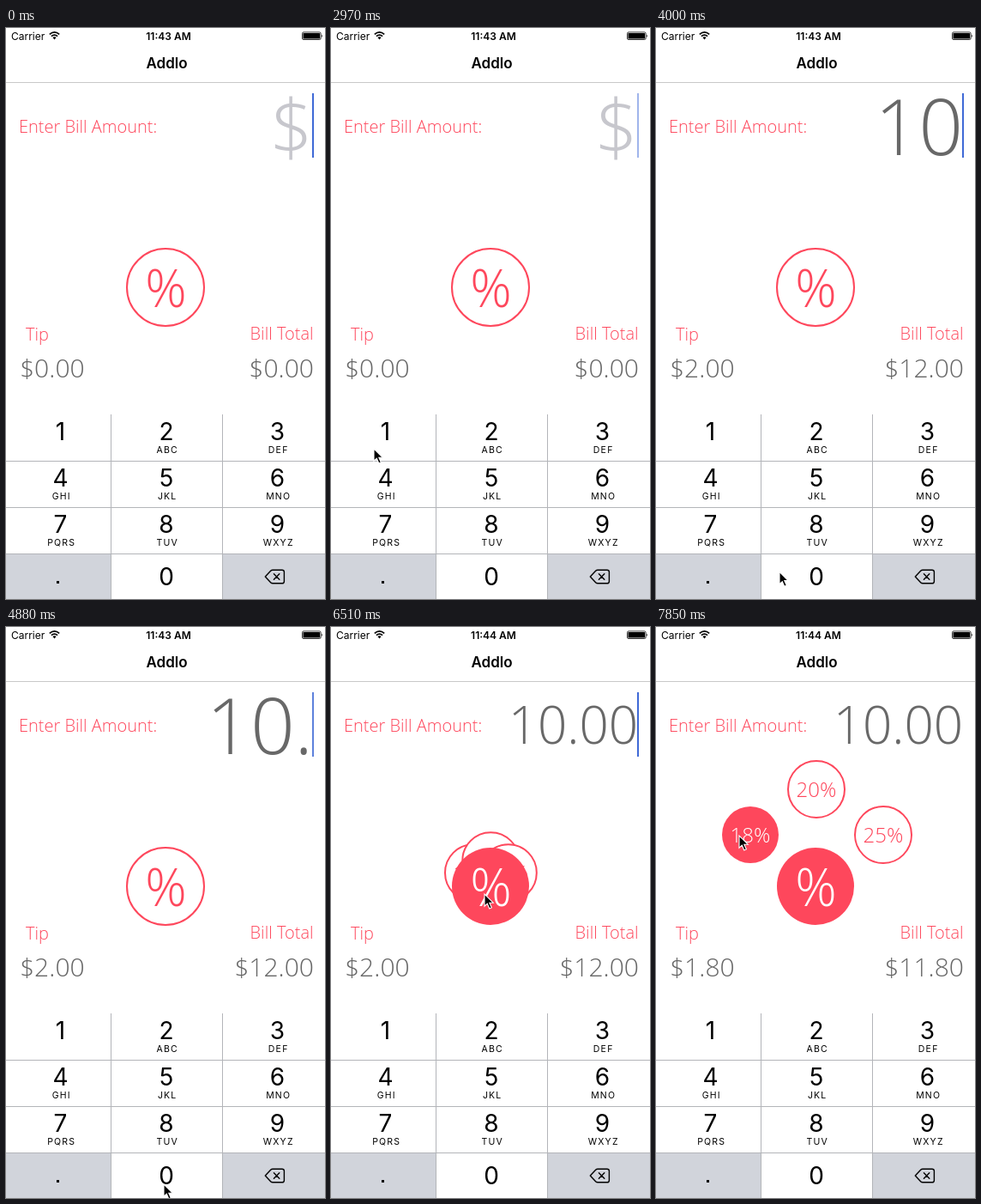
Animation, 372 px wide and 665 px high, one loop 8000 ms. Source, as an HTML page:

```html
<!DOCTYPE html>
<html lang="en">
<head>
<meta charset="utf-8">
<title>Tip calculator</title>
<style>
html, body { margin: 0; width: 100%; height: 100%; overflow: hidden; background: #fff; }
svg { display: block; width: 372px; height: 665px; }
text { font-family: Inter, Roboto, sans-serif; fill: #000; }
.light { font-family: "Open Sans", "Noto Sans", sans-serif; font-weight: 300; }
.red { fill: #fe475c; }
.gray { fill: #686868; }
.mid { text-anchor: middle; }
.end { text-anchor: end; }
</style>
</head>
<body>
<svg id="stage" viewBox="0 0 372 665" xmlns="http://www.w3.org/2000/svg">
  <rect width="372" height="665" fill="#fff"/>
  <text x="6" y="13.5" font-size="12">Carrier</text>
  <g fill="none" stroke="#000" stroke-width="1.7">
    <path d="M50.8 7.4Q56.5 2.4 62.2 7.4"/>
    <path d="M52.9 9.7Q56.5 6.5 60.1 9.7"/>
  </g>
  <path d="M54.4 11.1Q56.5 9.4 58.6 11.1L56.5 13.4Z"/>
  <text id="clock" class="mid" x="189.5" y="13.5" font-size="12" font-weight="600"></text>
  <rect x="345.5" y="4.9" width="21.6" height="8.6" rx="1.5" fill="none" stroke="#000" stroke-width=".8"/>
  <rect x="346.5" y="5.9" width="19.6" height="6.6" rx=".6"/>
  <path d="M368 7.5Q369.8 9.2 368 10.9Z"/>
  <text class="mid" x="187.5" y="47" font-size="17" font-weight="600">Addlo</text>
  <rect y="63" width="372" height="1" fill="#c9c9c9"/>

  <text class="light red" x="15" y="122" font-size="20">Enter Bill Amount:</text>
  <text id="bill" class="light end" x="358"></text>
  <rect id="caret" x="357" y="76" width="2" height="75" fill="#3f69d6"/>

  <g id="menu"></g>
  <circle id="button" cx="186" cy="302" r="45" stroke="#fe475c" stroke-width="2"/>
  <text id="percent" class="light mid" x="186.5" y="325" font-size="60">%</text>

  <text class="light red" x="23" y="364" font-size="20">Tip</text>
  <text class="light red end" x="358.5" y="363" font-size="20">Bill Total</text>
  <text id="tip" class="light gray" x="16" y="407" font-size="30"></text>
  <text id="total" class="light gray end" x="359" y="407" font-size="30"></text>

  <g id="pad"></g>
  <path d="M302.3 639L308.6 632.2Q309.6 631.2 311 631.2H322Q324.4 631.2 324.4 633.6V644.4Q324.4 646.8 322 646.8H311Q309.6 646.8 308.6 645.8ZM312.4 635.8L318.8 642.2M318.8 635.8L312.4 642.2"
    fill="none" stroke="#000" stroke-width="1.4" stroke-linejoin="round" stroke-linecap="round"/>
  <path id="pointer" d="M0 0V14.2L3.3 11.2L5.8 16.9L8.3 15.8L5.8 10.2H10.2Z" fill="#000" stroke="#fff" stroke-width="1.1"/>
</svg>
<script>
const LOOP = 8000, RED = '#fe475c', KEY = '#d1d4db';
const $ = id => document.getElementById(id);

function add(parent, tag, attrs, label) {
  const el = document.createElementNS('http://www.w3.org/2000/svg', tag);
  for (const k in attrs) el.setAttribute(k, attrs[k]);
  if (label) el.textContent = label;
  parent.appendChild(el);
  return el;
}
const set = (el, attrs) => { for (const k in attrs) el.setAttribute(k, attrs[k]); };
const clamp = v => Math.max(0, Math.min(1, v));
const smooth = v => { v = clamp(v); return v * v * (3 - 2 * v); };

// Keypad
const pad = $('pad'), keys = {};
const edges = [0, 122, 252, 372], mids = [63.5, 187, 316.5];
const letters = ['', 'ABC', 'DEF', 'GHI', 'JKL', 'MNO', 'PQRS', 'TUV', 'WXYZ'];
['1', '2', '3', '4', '5', '6', '7', '8', '9', '.', '0', 'del'].forEach((name, i) => {
  const col = i % 3, y = 450 + 54 * Math.floor(i / 3);
  const base = i === 9 || i === 11 ? KEY : '#fff';
  const rect = add(pad, 'rect', { x: edges[col], y, width: edges[col + 1] - edges[col], height: 54, fill: base });
  keys[name] = { rect, base, down: base === KEY ? '#fff' : KEY };
  if (name === '.') add(pad, 'rect', { x: 59, y: 644, width: 3, height: 3 });
  else if (name !== 'del') add(pad, 'text', { class: 'mid', x: mids[col], y: i < 9 ? y + 30 : 649, 'font-size': 28 }, name);
  if (letters[i]) add(pad, 'text', { class: 'mid', x: mids[col] + 1.2, y: y + 45, 'font-size': 10.5, 'letter-spacing': 1.2 }, letters[i]);
});
for (const y of [504, 558, 612]) add(pad, 'rect', { x: 0, y, width: 372, height: 1, fill: '#b3b5b9' });
for (const x of [122, 252]) add(pad, 'rect', { x, y: 450, width: 1, height: 215, fill: '#b3b5b9' });

// Tip choices that slide out from behind the button
const choices = [['18%', 110, 242], ['20%', 187, 189], ['25%', 265, 242]].map(([label, x, y]) => {
  const g = add($('menu'), 'g', {});
  const disc = add(g, 'circle', { r: 33, fill: '#fff', stroke: RED, 'stroke-width': 2 });
  const text = add(g, 'text', { class: 'light mid', y: 9, 'font-size': 24, fill: RED }, label);
  return { g, disc, text, x, y };
});

// Timeline
const entries = [
  [0, '', 90, 0], [3080, '1', 90, 1], [3760, '10', 90, 10],
  [4280, '10.', 90, 10], [4960, '10.0', 77, 10], [5110, '10.00', 60, 10]
];
const presses = [[3080, 3190, '1'], [3760, 3860, '0'], [4280, 4390, '.'], [4960, 5050, '0'], [5110, 5170, '0']];
const blinks = [
  [130, 720], [1180, 1630], [2080, 2520], [2890, 3080], [4855, 4960],
  [5640, 6060], [6560, 7000], [7470, 8100]
];
const path = [
  [1790, 337, 112], [1900, 333, 115], [2000, 333, 115], [2690, 136, 424], [2960, 50, 490],
  [3200, 50, 490], [3640, 176, 640], [3850, 176, 640], [4220, 88, 622], [4380, 88, 622],
  [4570, 184, 649], [5560, 184, 649], [6210, 179, 311], [6740, 179, 311], [7220, 97, 243], [8000, 97, 243]
];
const OPEN = 6400, PICK = 7520, MINUTE = 5700;

function pointerAt(t) {
  let i = path.findIndex(p => p[0] > t) - 1;
  if (i < 0) i = 0;
  const a = path[i], b = path[i + 1], k = smooth((t - a[0]) / (b[0] - a[0]));
  return [a[1] + (b[1] - a[1]) * k, a[2] + (b[2] - a[2]) * k];
}

function caretAt(t) {
  const gap = blinks.find(([off, on]) => t >= off && t < on);
  return gap ? 1 - clamp((t - gap[0]) / 160) : 1;
}

const money = v => '$' + v.toFixed(2);

function draw(t) {
  $('clock').textContent = t < MINUTE ? '11:43 AM' : '11:44 AM';

  const [, typed, size, value] = entries.filter(e => e[0] <= t).pop();
  $('bill').textContent = typed || '$';
  set($('bill'), { 'font-size': size, y: 113 + 0.388 * size, style: 'fill:' + (typed ? '#686868' : '#c7c7cd') });
  set($('caret'), { opacity: caretAt(t) });

  const tip = value * (t < PICK ? 0.2 : 0.18);
  $('tip').textContent = money(tip);
  $('total').textContent = money(value + tip);

  const open = t >= OPEN, k = smooth((t - OPEN) / 330);
  set($('button'), { fill: open ? RED : '#fff', 'stroke-width': open ? 0 : 2 });
  set($('percent'), { style: 'fill:' + (open ? '#fff' : RED) });
  choices.forEach((c, i) => {
    const on = i === 0 && t >= PICK;
    set(c.g, {
      transform: `translate(${186 + (c.x - 186) * k} ${302 + (c.y - 302) * k})`,
      visibility: open ? 'visible' : 'hidden'
    });
    set(c.disc, { fill: on ? RED : '#fff', 'stroke-width': on ? 0 : 2 });
    set(c.text, { style: 'fill:' + (on ? '#fff' : RED) });
  });

  const press = presses.find(p => t >= p[0] && t < p[1]);
  for (const name in keys) {
    const key = keys[name];
    set(key.rect, { fill: press && press[2] === name ? key.down : key.base });
  }

  const [x, y] = pointerAt(t);
  set($('pointer'), { transform: `translate(${x} ${y})`, visibility: t < path[0][0] ? 'hidden' : 'visible' });
}

function tick() {
  draw(performance.now() % LOOP);
  requestAnimationFrame(tick);
}
tick();
</script>
</body>
</html>
```
